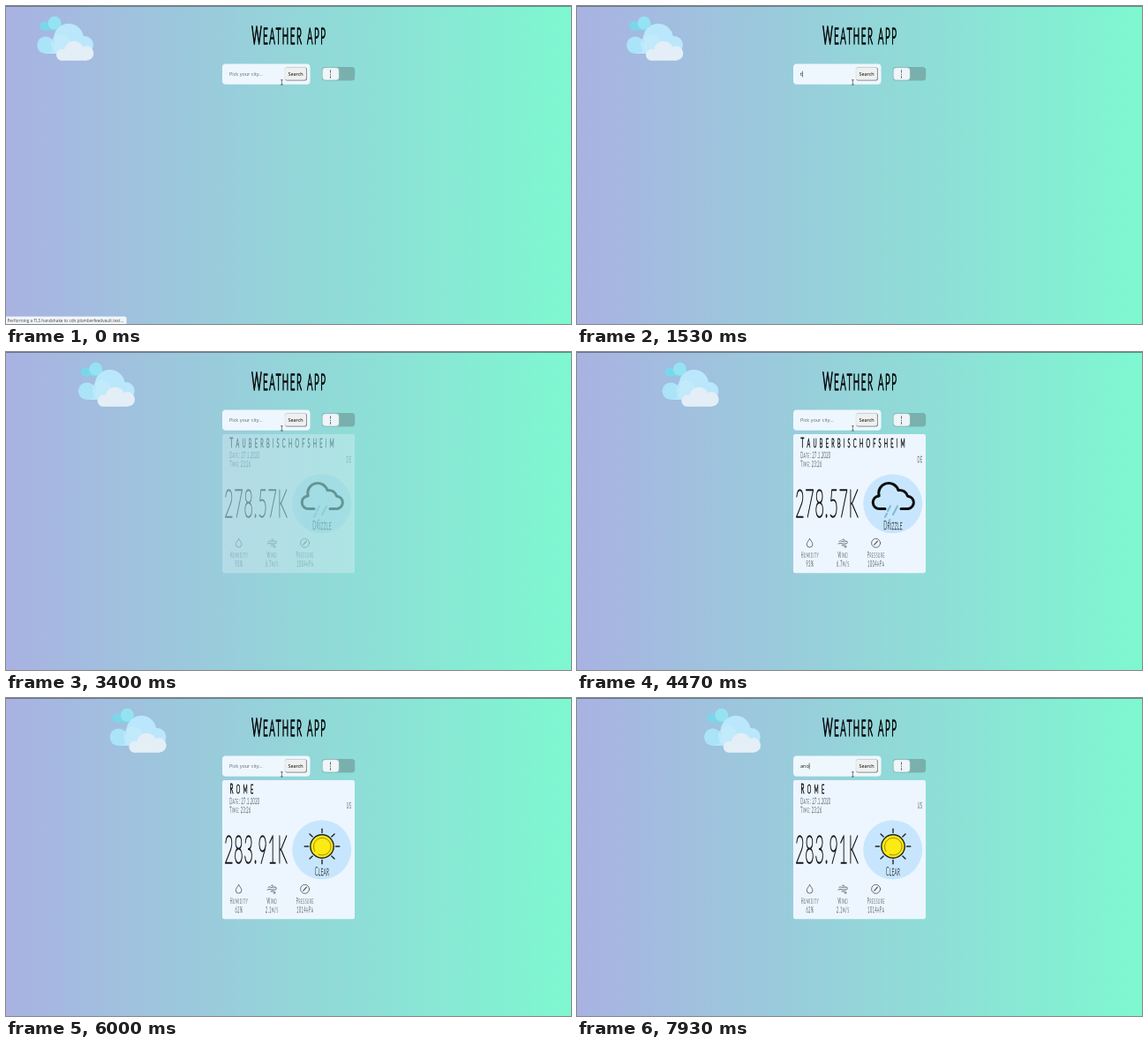
Write an HTML page that moves like this. It is 640 px wide and 360 px high and loops after 8000 ms.

```html
<!DOCTYPE html>
<html lang="en">
<head>
<meta charset="utf-8">
<title>Weather app</title>
<style>
  html, body { margin: 0; width: 100%; height: 100%; overflow: hidden; }
  svg { display: block; width: 100vw; height: 100vh; }
  .ui { font: 5.5px "Open Sans", "Noto Sans", sans-serif; }
  .hand { font-family: Lato, "Open Sans", sans-serif; text-transform: uppercase; }
  .hand text { vector-effect: non-scaling-stroke; stroke-linejoin: round; }
  .line { fill: none; stroke-linecap: round; stroke-linejoin: round; }
</style>
</head>
<body>
<svg viewBox="0 0 640 360" preserveAspectRatio="none">
  <defs>
    <linearGradient id="sky">
      <stop offset="0" stop-color="#a9b2e2"/>
      <stop offset="1" stop-color="#7ef8d0"/>
    </linearGradient>
  </defs>
  <rect width="640" height="360" fill="url(#sky)"/>
  <rect width="640" height="1" fill="#3d4a55" opacity=".6"/>

  <g id="clouds">
    <g fill="#7ad7ea">
      <circle cx="43.3" cy="22.6" r="5"/><circle cx="59.5" cy="23.6" r="4"/>
      <rect x="43" y="20" width="17" height="7.6"/>
    </g>
    <circle cx="55" cy="19.3" r="7.5" fill="#95e3f2"/>
    <g fill="#bae7fb">
      <circle cx="71" cy="37" r="17"/><circle cx="89" cy="44" r="10"/>
      <rect x="45" y="42" width="44" height="12"/>
    </g>
    <circle cx="45" cy="44.3" r="9.8" fill="#abe3f9"/>
    <circle cx="62" cy="43" r="11" fill="#c6ecfb" opacity=".6"/>
    <g fill="#e4eef6">
      <circle cx="77" cy="50.5" r="10.8"/><circle cx="91" cy="53.5" r="8.3"/>
      <circle cx="63.5" cy="55.3" r="6.5"/><rect x="63" y="53" width="28" height="8.8"/>
    </g>
  </g>

  <g id="title" class="hand"></g>

  <g class="ui">
    <rect x="245" y="65.5" width="99.5" height="23.3" rx="4" fill="#eef7fe"/>
    <text id="field" x="253" y="79"></text>
    <rect id="caret" y="73.8" width=".6" height="6.6" fill="#111"/>
    <rect x="316.2" y="69.6" width="24.6" height="15" rx="2" fill="#666"/>
    <rect x="316" y="69.4" width="24" height="14.4" rx="2" fill="#eff0f0" stroke="#cfd3d5" stroke-width=".4"/>
    <text x="319.4" y="79">Search</text>
    <rect x="357.8" y="69" width="37.4" height="15.6" rx="3.6" fill="#79b0ad"/>
    <rect x="358.6" y="69.9" width="18.4" height="13.8" rx="3.2" fill="#eff5f8" stroke="#cbd8da" stroke-width=".5"/>
    <path d="M367.5 72.4v3.2m0 1.2v1.4m0 1v2.6" stroke="#444" stroke-width=".8"/>
  </g>

  <g id="card">
    <rect x="245" y="93" width="150" height="157.3" rx="2.4" fill="#edf6fe"/>
    <circle cx="357.7" cy="171.8" r="33.5" fill="#c7e6fd"/>
    <g id="drizzle" class="line">
      <path d="M349 177.5H342.8A7.3 7.3 0 0 1 342.2 162.9A11.3 11.3 0 0 1 364 156.6A9 9 0 0 1 374.5 163.2A7.2 7.2 0 0 1 375.3 177.5H367" stroke="#0b0d10" stroke-width="3"/>
      <path d="M355 174.5l-3 5.5M363 174.5l-5 9.5M351 183l-2 3.6M354.3 190l-1 2" stroke="#83bdd2" stroke-width="2.2"/>
    </g>
    <g id="sun" class="line" stroke="#20242a" stroke-width="1.4">
      <circle cx="358" cy="168" r="13.2" fill="#fdea12"/>
      <path d="M350 173.5a9.8 9.8 0 1 1 4 3.5" stroke="#6f6410" stroke-width=".7"/>
    </g>
    <g class="line" stroke="#4a4f54" stroke-width=".8">
      <path d="M263.6 211.6c1.6 2.4 3.3 4.2 3.3 6.2a3.3 3.3 0 0 1-6.6 0c0-2 1.7-3.8 3.3-6.2z"/>
      <path d="M297 214.2c2-1 3.4.8 5 .2a1.3 1.3 0 1 0-1.6-1.8M296 217c3-1.4 5 .8 9 0a1.5 1.5 0 1 0-1.6-2M300 219c1.6-.4 3 0 4 .4a1 1 0 1 1-1 1.2"/>
      <circle cx="338.6" cy="216.3" r="5"/>
      <path d="M336.8 218.2l3.6-4" stroke-width="1.2"/>
    </g>
    <g id="data" class="hand"></g>
  </g>

  <path d="M311.4 83.8h2m-1 0v5.2m-1 0h2" class="line" stroke="#333" stroke-width=".6"/>

  <g id="status" class="ui">
    <path d="M0 351.6H134.5a2 2 0 0 1 2 2V360H0z" fill="#f1f5f9"/>
    <text x="1.5" y="357.8" font-size="4.73" fill="#444">Performing a TLS handshake to cdn.plomberfeedvault.test...</text>
  </g>
</svg>
<script>
const LOOP = 8000;
const NARROW = 0.4; // proportions of the tall handwritten face
const $ = id => document.getElementById(id);
const clamp = v => Math.max(0, Math.min(1, v));

// Small-caps lettering: lowercase runs become slightly smaller capitals.
function hand(str, x, y, size, { gap = 0, color = '#333', line = 0.3, weight = 300, anchor = 'start' } = {}) {
  const body = str.replace(/[a-z]+/g, m => `<tspan font-size="${size * 0.88}">${m}</tspan>`);
  return `<text transform="translate(${x} ${y}) scale(${NARROW} 1)" font-size="${size}" font-weight="${weight}"
    letter-spacing="${gap}" text-anchor="${anchor}" fill="${color}" stroke="${color}" stroke-width="${line}">${body}</text>`;
}

const reports = [
  { city: 'Tauberbischofsheim', land: 'DE', temp: '278.57K', sky: 'Drizzle', stats: ['93%', '6.7m/s', '1004hPa'] },
  { city: 'Rome', land: 'US', temp: '283.91K', sky: 'Clear', stats: ['62%', '2.1m/s', '1014hPa'] }
];

function report({ city, land, temp, sky, stats }) {
  const soft = { gap: 1, color: '#5f666b', line: 0.2 };
  const mid = { gap: 1.5, color: '#5f666b', line: 0.2, anchor: 'middle' };
  const columns = ['Humidity', 'Wind', 'Pressure'].map((name, i) => {
    const x = 263.9 + i * 37.5;
    return hand(name, x, 232.8, 9, mid) + hand(stats[i], x, 242.8, 9, mid);
  });
  return hand(city, 253.6, 108.3, 16, { gap: 8.2, color: '#1c1f22', line: 0.9 })
    + hand('Date: 27.1.2020', 253.3, 120.4, 9.6, soft)
    + hand('Time: 23:26', 253.3, 130.4, 9.6, soft)
    + hand(land, 391.5, 125.4, 9.6, { ...soft, anchor: 'end' })
    + hand(temp, 247.2, 187.4, 44.5, { gap: 2, color: '#17191c', line: 1.25, weight: 100 })
    + hand(sky, 358, 201, 13.8, { gap: 0.8, color: '#3b4248', anchor: 'middle' })
    + columns.join('');
}

// Typing: first key, time per key, and when the field is sent and cleared.
const entries = [
  { word: 'tauberbischofsheim', start: 1490, step: 62, sent: 2880 },
  { word: 'rome', start: 4600, step: 100, sent: 5050 },
  { word: 'ano', start: 7600, step: 140, sent: LOOP }
];

function typing(t) {
  let text = '', touched = 500;
  for (const { word, start, step, sent } of entries) {
    if (t < start) break;
    const n = Math.min(word.length, Math.floor((t - start) / step) + 1);
    text = t < sent ? word.slice(0, n) : '';
    touched = t < sent ? start + (n - 1) * step : sent;
  }
  return { text, caret: t >= touched && (t - touched) % 1000 < 500 };
}

$('title').innerHTML = hand('Weather app', 278.2, 42.8, 28, { gap: 3.8, color: '#0c0e10', line: 1.5 });
$('sun').innerHTML += Array.from({ length: 8 }, (_, i) =>
  `<path d="M358 152.6v-4.4" transform="rotate(${i * 45} 358 168)"/>`).join('');

const field = $('field');
let shownText = null, shownReport = -1;
const show = (id, on) => $(id).setAttribute('visibility', on ? 'inherit' : 'hidden');

function draw(t) {
  $('clouds').setAttribute('transform', `translate(${t * 0.01372} 0)`);
  show('status', t < 500);

  const { text, caret } = typing(t);
  if (text !== shownText) {
    shownText = text;
    field.textContent = text || 'Pick your city...';
    field.setAttribute('fill', text ? '#111' : '#61686d');
  }
  $('caret').setAttribute('x', 253 + (text ? field.getComputedTextLength() : 0));
  show('caret', caret);

  $('card').setAttribute('opacity', clamp((t - 3060) / 1040));
  const index = t < 5170 ? 0 : 1;
  if (index !== shownReport) {
    shownReport = index;
    $('data').innerHTML = report(reports[index]);
  }
  const sunny = t >= 5530;
  show('drizzle', !sunny);
  show('sun', sunny);
}

const began = performance.now();
function tick() {
  draw((performance.now() - began) % LOOP);
  requestAnimationFrame(tick);
}
tick();
</script>
</body>
</html>
```
